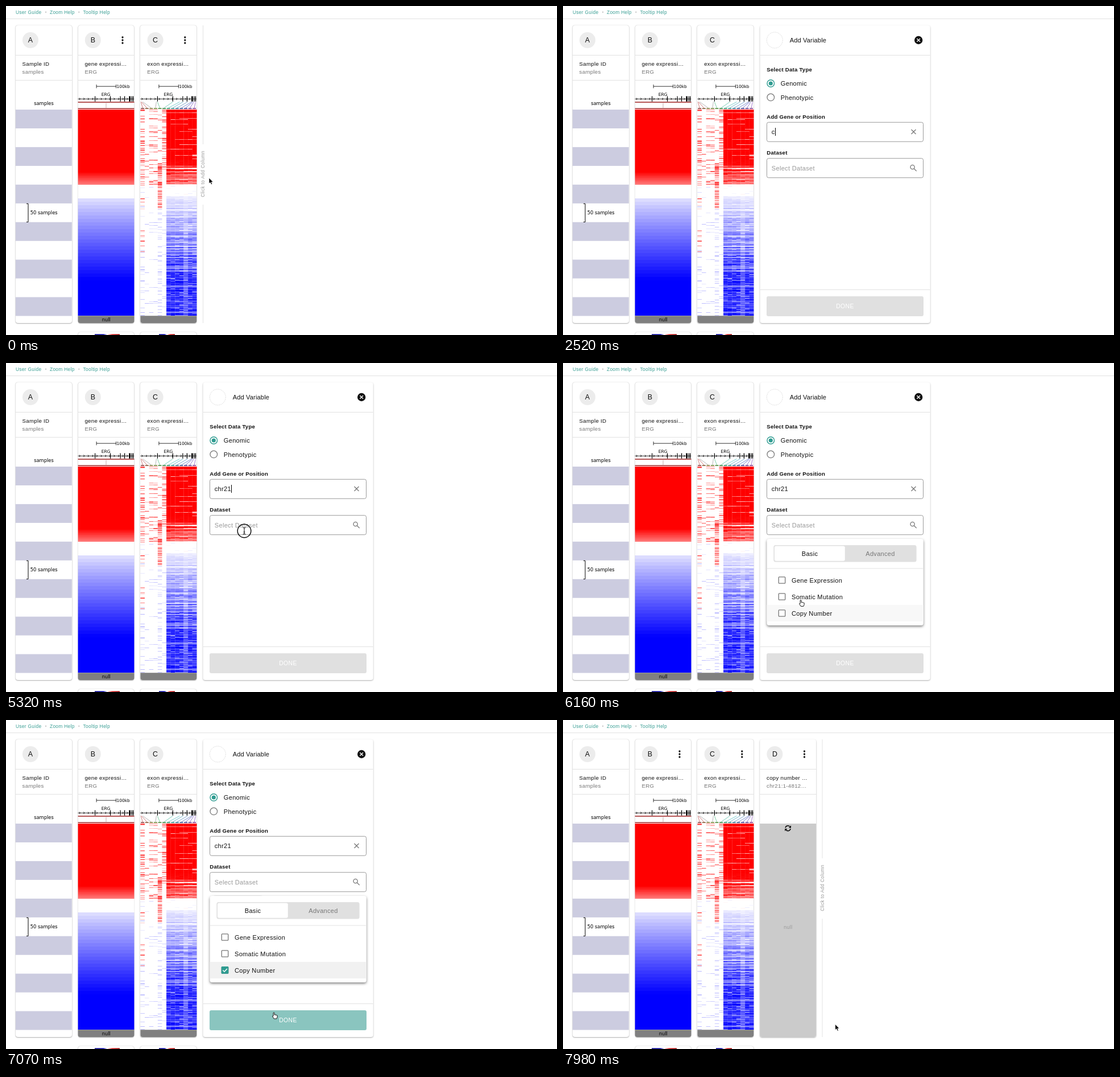
Write an HTML page with a canvas that moves like this. It is 969 px wide and 578 px high and loops after 8 s.

```html
<!DOCTYPE html>
<html lang="en">
<head>
<meta charset="utf-8">
<title>Add a column</title>
<style>
html, body { margin: 0; width: 100%; height: 100%; overflow: hidden; background: #fff; }
#stage { position: relative; width: 969px; height: 578px; overflow: hidden; }
#stage > * { position: absolute; left: 0; top: 0; }
#stage .card { border-radius: 4px; background: #fff; box-shadow: 0 1px 2px rgba(0,0,0,.28), 0 0 1.5px rgba(0,0,0,.25); }
text { font: 11.05px "Liberation Sans", Arial, sans-serif; letter-spacing: .3px; fill: #111; white-space: pre; }
.nav { font-size: 8.4px; fill: #3b9f95; }
.side { font-size: 8.4px; letter-spacing: .32px; fill: #999; }
.sub { font-size: 9.66px; }
.dim { fill: #777; }
.hint { fill: #999; }
.label { font-size: 9.66px; font-weight: bold; letter-spacing: .2px; }
.title { letter-spacing: .15px; }
.badge { font-size: 12.4px; letter-spacing: 0; }
.plot { font: 8.35px "DejaVu Sans", Verdana, sans-serif; letter-spacing: 0; fill: #000; }
.tiny { font-size: 7.5px; }
.chip { font-size: 9.66px; letter-spacing: .2px; }
.done { font-size: 10.35px; letter-spacing: .45px; fill: #fff; }
.mid { text-anchor: middle; }
.rule { stroke: #e2e2e2; }
.icon { stroke: #777; stroke-width: 1.3; fill: none; }
.ink { stroke: #000; fill: none; }
.caret { stroke: #000; stroke-width: 1; }
.box { fill: #fff; stroke: #9a9a9a; }
.sheet { fill: #fff; filter: drop-shadow(0 1px 1.2px rgba(0,0,0,.32)); }
.menu { fill: #fff; filter: drop-shadow(0 2px 2px rgba(0,0,0,.5)); }
</style>
</head>
<body>
<div id="stage"></div>
<script>
const W = 969, H = 578, LOOP = 8000, TEAL = '#2f9c91';
const COL_A = 16.8, COL_B = 126.6, COL_C = 236.4, COL_W = 98.9;
const stage = document.getElementById('stage');

// ---- markup helpers
const text = (x, y, s, cls = '', more = '') => `<text x="${x}" y="${y}" class="${cls}" ${more}>${s}</text>`;
const rect = (x, y, w, h, fill, r = 0, more = '') =>
  `<rect x="${x}" y="${y}" width="${w}" height="${h}" rx="${r}" ${fill ? `fill="${fill}"` : ''} ${more}/>`;
const path = (d, cls = 'ink', more = '') => `<path d="${d}" class="${cls}" ${more}/>`;
const dot = (x, y, r, fill, more = '') => `<circle cx="${x}" cy="${y}" r="${r}" fill="${fill}" ${more}/>`;
const group = (on, ...parts) => `<g data-on="${on}">${parts.join('')}</g>`;
const cross = (x, y, r = 4) => path(`M${x - r} ${y - r}l${2 * r} ${2 * r}m0 ${-2 * r}l${-2 * r} ${2 * r}`, 'icon');
const lens = y => dot(614.6, y - 1.5, 3.6, 'none', 'class="icon"') + path(`M617.3 ${y + 1.2}l4.4 4.4`, 'icon', 'stroke-width="1.8"');
const caret = (y, more) => path(`M367.5 ${y - 7}v14`, 'caret', more);

// ---- columns
function header(x, letter, name, sub) {
  return dot(x + 26.2, 60, 14, '#ececec') + text(x + 26.2, 64.3, letter, 'badge mid') +
    path(`M${x} 86.5h99M${x} 130.5h99`, 'rule') +
    text(x + 11.8, 104.7, name, 'sub') + text(x + 11.8, 119.3, sub, 'sub dim');
}
const kebab = x => [55, 60, 65].map(y => dot(x, y, 1.65, '#111')).join('');

function track(x) {
  let s = path(`M${x + 32.5} 141.2h35M${x + 32.5} 138v6.4M${x + 67} 138v6.4`, 'ink', 'stroke-width=".8"') +
    text(x + 67.8, 144, '100kb', 'plot tiny') + text(x + 49, 157.6, 'ERG', 'plot tiny mid') +
    path(`M${x} 163.3h98.5`, 'ink', 'stroke-width=".8"');
  for (let i = 2; i < 90; i += 7.6) s += path(`M${x + i} 161.5l2 1.8-2 1.8`, 'ink', 'stroke-width=".9"');
  for (const [p, w] of [[30, 1.2], [57, 1.2], [74.5, 1.2], [82, 1.4], [91, 2.6], [94.5, 1.2], [97, 1.4]])
    s += rect(x + p - w / 2, 158.5, w, 9.3, '#000');
  return s;
}
const footer = x => path(`M${x} 544.3h${COL_W}v8.7q0 4-4 4h${8 - COL_W}q-4 0-4-4z`, '', 'fill="#808080"');

function exonLinks(x) {
  const tops = [1, 2, 4, 28, 30, 57, 69, 75, 83, 90, 92, 94, 97];
  return tops.map((p, i) => {
    const end = x + 3.8 + i * 7.58, c = i > 1 && i < 4 ? '#999' : `hsl(${i < 2 ? 0 : 90 + i * 15},45%,50%)`;
    return `<path d="M${x + p} 168.5L${end} 179" stroke="${c}" stroke-width=".7" fill="none"/>` +
      rect(end - 3, 179.3, 6, 1.5, `hsl(${i * 25},50%,33%)`);
  }).join('');
}

function addStrip(x, on) {
  return group(on, path(`M${x} 34v209M${x} 349v208`, 'rule'),
    text(0, 0, 'Click to Add Column', 'side mid', `transform="translate(${x + 2.5} 295)rotate(-90)"`));
}

function base() {
  let s = path('M0 22.5H969', 'rule') +
    text(17, 13.6, 'User Guide', 'nav') + text(77, 13.6, 'Zoom Help', 'nav') + text(135.6, 13.6, 'Tooltip Help', 'nav') +
    dot(70, 10.7, 1.3, '#ccc') + dot(128.3, 10.7, 1.3, '#ccc');
  s += header(COL_A, 'A', 'Sample ID', 'samples') + header(COL_B, 'B', 'gene expressi…', 'ERG') +
    header(COL_C, 'C', 'exon expressi…', 'ERG');
  s += text(66.5, 173.6, 'samples', 'plot mid');
  for (let i = 0; i < 6; i++) s += rect(COL_A, 182 + i * 65.9, COL_W, 33, '#cccce0');
  s += path('M36 347.3h3v32.2h-3') + text(42.7, 366, '50 samples', 'plot');
  s += track(COL_B) + track(COL_C) + exonLinks(COL_C) + footer(COL_B) + footer(COL_C);
  s += path(`M${COL_B} 169h${COL_W}M${COL_B} 180.3h${COL_W}`, '', 'stroke="#a02020" stroke-width="1.6"') +
    path('M176 169.5v10', '', 'stroke="#b99" stroke-width=".8"');
  s += text(176.3, 553.7, 'null', 'plot mid');
  s += rect(156, 576.5, 44, 3, 'url(#key)') + rect(269, 576.5, 28, 3, 'url(#key)');
  return s + group('0-770 7490-8000', kebab(205), kebab(314.8));
}

// ---- form
const geneList = (on, names) => group(on, names.map((n, i) => text(370.3, 266.2 + i * 34.7, n)).join(''));

function checkRow(y, name) {
  return rect(379.3, y - 5.7, 11.4, 11.4, '#fff', 1, 'stroke="#777" stroke-width="1.3"') + text(402, y + 4, name);
}

function panel() {
  const form = rect(346.5, 34, 299.3, 523, '', 4, 'class="sheet"') +
    dot(372.3, 60, 14, 'none', 'stroke="#ccc" stroke-width=".8" stroke-dasharray="1.6 1.4"') +
    text(398.8, 64, 'Add Variable', 'title') + dot(625.2, 60, 7.2, '#111') +
    path('M622.4 57.2l5.6 5.6m0-5.6l-5.6 5.6', '', 'stroke="#fff" stroke-width="1.4"') +
    path('M346.5 86.5h299M346.5 498.5h299', 'rule') +
    text(358.3, 115, 'Select Data Type', 'label') +
    dot(365.3, 136, 6.3, '#fff', `stroke="${TEAL}" stroke-width="1.4"`) + dot(365.3, 136, 3.6, TEAL) +
    dot(365.3, 160.4, 6.3, '#fff', 'stroke="#777" stroke-width="1.3"') +
    text(382.8, 140, 'Genomic') + text(382.8, 164.5, 'Phenotypic') +
    text(358.3, 197.5, 'Add Gene or Position', 'label') + rect(358.5, 204.3, 275, 34, '', 3, 'class="box"') +
    text(358.3, 261, 'Dataset', 'label') + rect(358.5, 267.7, 275, 34, '', 3, 'class="box"') +
    group('0-2450', text(366.8, 225, 'Select Gene or Position', 'hint'), lens(221)) +
    group('2450-8000', cross(616.5, 221)) +
    text(366.8, 225, '', '', 'id="typed"') + text(366.8, 288.7, 'Select Dataset', 'hint') + lens(284.5) +
    caret(221, 'id="geneCaret" data-on="1750-2240 2450-3290 3850-4550 5040-5390"') +
    caret(284.7, 'data-on="5390-5950 6440-7000"') +
    rect(358, 510, 276, 35, '#e0e0e0', 3, 'id="doneBox"') + text(496, 531, 'DONE', 'done mid');

  const chip = group('6580-7490', rect(358.4, 308, 99.6, 22.8, '#ececec', 11.4), text(366.5, 323.2, 'Copy Number', 'chip'), cross(442, 319.5));

  const genes = group('2590-4480', rect(358.5, 244.5, 275.3, 192.2, '', 4, 'class="menu"'),
    rect(359, 244.8, 264, 35, '#f4f4f4', 3), rect(622.5, 245, 11, 191, '#fafafa', 3),
    path('M622.5 245v191', '', 'stroke="#ececec"'), rect(625.2, 247, 5.8, 127, '#c1c1c1', 2.9),
    '<g clip-path="url(#listClip)">',
    geneList('2590-3220', ['CA1', 'CA10', 'CA11', 'CA12', 'CA13', 'CA14']),
    geneList('3220-4480', ['CHRAC1', 'CHRD', 'CHRDL1', 'CHRDL2', 'CHRFAM7A', 'CHRM1']), '</g>');

  const sets = group('5390-7420', rect(358.5, 309, 275.3, 152, '', 4, 'class="menu"'),
    rect(370.4, 320, 251.2, 29.4, '#e0e0e0', 3.5), rect(372, 321.6, 123.8, 26.2, '#fff', 3),
    text(434, 338.8, 'Basic', 'mid'), text(558, 338.8, 'Advanced', 'mid dim'), path('M359 361h274.5', 'rule'),
    group('6160-6510', rect(358.5, 425, 275.3, 29, '#f8f8f8')), group('6510-7420', rect(358.5, 425, 275.3, 29, '#f1f1f1')),
    checkRow(381.5, 'Gene Expression'), checkRow(410.5, 'Somatic Mutation'), checkRow(439.5, 'Copy Number'),
    group('6580-7420', rect(378.7, 433.1, 12.6, 12.6, TEAL, 1.5),
      path('M381.4 439.5l2.6 2.7 4.9-5.2', '', 'stroke="#fff" stroke-width="1.5" fill="none"')));

  return group('770-7490', form, chip, genes, sets);
}

function newColumn() {
  const x = 346.2;
  return group('7490-8000', rect(x, 34, COL_W, 523, '', 4, 'class="sheet"'), header(x, 'D', 'copy number …', 'chr21:1-4812…'), kebab(424.5),
    path(`M${x} 182h${COL_W}v371q0 4-4 4h${8 - COL_W}q-4 0-4-4z`, '', 'fill="#cbcbcb"'),
    text(395.7, 367.4, 'null', 'plot mid', 'style="fill:#9a9a9a"'),
    `<g id="spin"><path d="M-4.5-.8A4.5 4.2 0 0 1 3.2-3.2M4.5.8A4.5 4.2 0 0 1-3.2 3.2" class="ink" stroke-width="1.5"/>` +
    `<path d="M5.4-5v4.2h-4.2zM-5.4 5v-4.2h4.2z"/></g>`);
}

const pointer = `<g id="pointer">
  <circle id="ring" fill="none" stroke="#111" stroke-width="1.5"/>
  <path data-on="0-210 840-1050 6020-6140 6720-7040 7840-8000" d="M0 0v10l2.3-2.1 1.6 3.7 1.8-.8-1.6-3.5h3.2z" fill="#000" stroke="#fff" stroke-width=".7"/>
  <path data-on="1050-2450 4340-6020" d="M-2.5-6Q0-6 0-4.4Q0-6 2.5-6M0-4.4v9M-2.5 6Q0 6 0 4.4Q0 6 2.5 6M-1.3 2h2.6" class="ink"/>
  <path data-on="210-840 6140-6720 7040-7840" d="M-1 .8q1-1.4 2 0v3.6l1-.4 1 .7 1-.4 1 .8 1 .2v3l-1.2 2.9h-4.6l-2.6-4q-.4-1.5 1.4-.8z" fill="#fff" stroke="#000" stroke-width=".9"/>
</g>`;

const card = (x, y, h) => `<div class="card" style="left:${x}px;top:${y}px;width:${COL_W}px;height:${h}px"></div>`;
stage.innerHTML = card(COL_A, 34, 523) + card(COL_B, 34, 523) + card(COL_C, 34, 523) +
  card(COL_B, 573, 30) + card(COL_C, 573, 30) +
  `<canvas width="${W}" height="${H}"></canvas>
  <svg width="${W}" height="${H}"><defs>
    <linearGradient id="key"><stop stop-color="#008"/><stop offset=".35" stop-color="#00a"/><stop offset=".5" stop-color="#fff"/><stop offset=".7" stop-color="#d22"/><stop offset="1" stop-color="#900"/></linearGradient>
    <clipPath id="listClip"><rect x="359" y="245" width="263" height="191"/></clipPath></defs>` +
  base() + addStrip(346.5, '0-770') + addStrip(456, '7490-8000') + panel() + newColumn() + pointer + '</svg>';

// ---- heatmaps
let seed = 7;
function rnd() {
  seed = (seed + 0x6D2B79F5) | 0;
  let n = Math.imul(seed ^ seed >>> 15, 1 | seed);
  n ^= n + Math.imul(n ^ n >>> 7, 61 | n);
  return ((n ^ n >>> 14) >>> 0) / 4294967296;
}
const clamp = v => Math.max(0, Math.min(1, v));
function heat(v) {
  const k = Math.round(255 * (1 - Math.min(1, Math.abs(v))));
  return v > 0 ? `rgb(255,${k},${k})` : `rgb(${k},${k},255)`;
}
// expression level at a height, from +1 (red) to -1 (blue)
function level(y) {
  if (y < 108) return 1;
  if (y < 131) return 1 - .5 * (y - 108) / 23;
  if (y < 152) return 0;
  return -Math.min(1, .1 + .9 * ((y - 152) / 144) ** .9);
}
function paintMaps() {
  const g = document.querySelector('canvas').getContext('2d');
  const bar = (x, y, w, h, v) => { g.fillStyle = heat(v); g.fillRect(x, 182 + y, w, h); };
  for (let y = 0; y < 362; y++) {
    const band = y < 150 ? 3 : 6;
    bar(COL_B, y, COL_W, 1, level(Math.floor(y / band) * band));
  }
  const step = COL_W / 13;
  const upper = [.3, .05, .24, .24, .1, .45], lower = [.16, .01, .04, .03, .18, .03];
  for (let y = 0; y < 362; y++) {
    const v = level(y), pair = rnd();
    for (let c = 0; c < 6; c++) {
      const top = y < (c === 5 ? 105 : 132), ruby = c === 4 && y > 98 && y < 175;
      const p = ruby ? .6 : top ? upper[c] : lower[c];
      if ((c === 2 || c === 3 ? pair : rnd()) > p) continue;
      const red = top || ruby || (c === 0 && y < 250 && rnd() < .6);
      bar(COL_C + c * step, y, step, 1, red ? .2 + .6 * rnd() : -.08 - .2 * rnd());
    }
    const row = rnd(), gap = 6 + Math.floor(rnd() * 7), len = 2 + rnd() * 5;
    for (let c = 6; c < 13; c++) {
      const inGap = c >= gap && c < gap + len;
      let a = 0;
      if (y < 131) {
        const fade = clamp((y - 85) / 46);
        a = 1 - .35 * fade * rnd();
        if (inGap && row < .18 + .4 * fade) a *= .25 + .4 * rnd();
        if (row < fade * .4) a *= .3;
      } else if (y < 152) {
        a = rnd() < .05 ? .12 * (rnd() - .6) : 0;
      } else {
        const deep = -v;
        a = -deep * (.6 + .5 * row) * (.85 + .25 * rnd());
        if (inGap && rnd() < .5 - .3 * deep) a *= .5;
        if (row < .3 - .22 * deep) a *= .4;
        if (c === 10) a *= .75;
      }
      if (a) bar(COL_C + c * step, y, step + .2, 1, a);
    }
  }
}
paintMaps();

// ---- timeline
const typing = [[0, ''], [2450, 'c'], [2590, 'ch'], [2800, 'chr'], [3850, 'chr2'], [4060, 'chr21']];
const moves = [[70, 357, 302], [350, 347, 302], [840, 347, 302], [1190, 398, 266], [1400, 403, 224], [4970, 403, 224],
  [5180, 419, 295], [5950, 419, 295], [6230, 418, 438], [6580, 418, 438], [6930, 462, 496], [7210, 480, 531],
  [7770, 480, 531], [7840, 478.7, 534.6]];
// press time and how many 70 ms steps its ring lasts
const presses = [[630, 2], [1680, 1], [5320, 1], [6440, 1], [7350, 2]];
const doneTones = [[6580, 224, 224, 224], [6830, 146, 203, 197], [7040, 146, 203, 197], [7230, 33, 120, 112]];

function along(keys, t) {
  const i = keys.findIndex(k => k[0] > t);
  if (i === 0) return keys[0].slice(1);
  if (i < 0) return keys[keys.length - 1].slice(1);
  const a = keys[i - 1], b = keys[i], u = (t - a[0]) / (b[0] - a[0]), e = u * u * (3 - 2 * u);
  return a.slice(1).map((v, j) => v + (b[j + 1] - v) * e);
}

const timed = [...document.querySelectorAll('[data-on]')].map(el => ({
  el, spans: el.dataset.on.split(' ').map(s => s.split('-').map(Number))
}));
const [typed, geneCaret, doneBox, pointerEl, ring, spin] =
  ['typed', 'geneCaret', 'doneBox', 'pointer', 'ring', 'spin'].map(id => document.getElementById(id));

function draw(t) {
  for (const { el, spans } of timed) el.style.display = spans.some(([a, b]) => t >= a && t < b) ? '' : 'none';
  const word = typing.filter(k => k[0] <= t).pop()[1];
  if (typed.textContent !== word) typed.textContent = word;
  const width = word ? typed.getComputedTextLength() : 0;
  geneCaret.setAttribute('transform', `translate(${Math.round(width)} 0)`);
  doneBox.setAttribute('fill', `rgb(${along(doneTones, t).map(Math.round)})`);
  pointerEl.setAttribute('transform', `translate(${along(moves, t)})`);
  const press = presses.find(([at, n]) => t >= at && t < at + n * 70);
  ring.setAttribute('r', press ? (t - press[0] < 70 ? 11.8 : 21.8) : 0);
  ring.style.display = press ? '' : 'none';
  spin.setAttribute('transform', `translate(395.6 190.2)rotate(${(t - 7980) * .18})`);
}

const start = performance.now();
function tick() {
  draw((performance.now() - start) % LOOP);
  requestAnimationFrame(tick);
}
tick();
</script>
</body>
</html>
```
